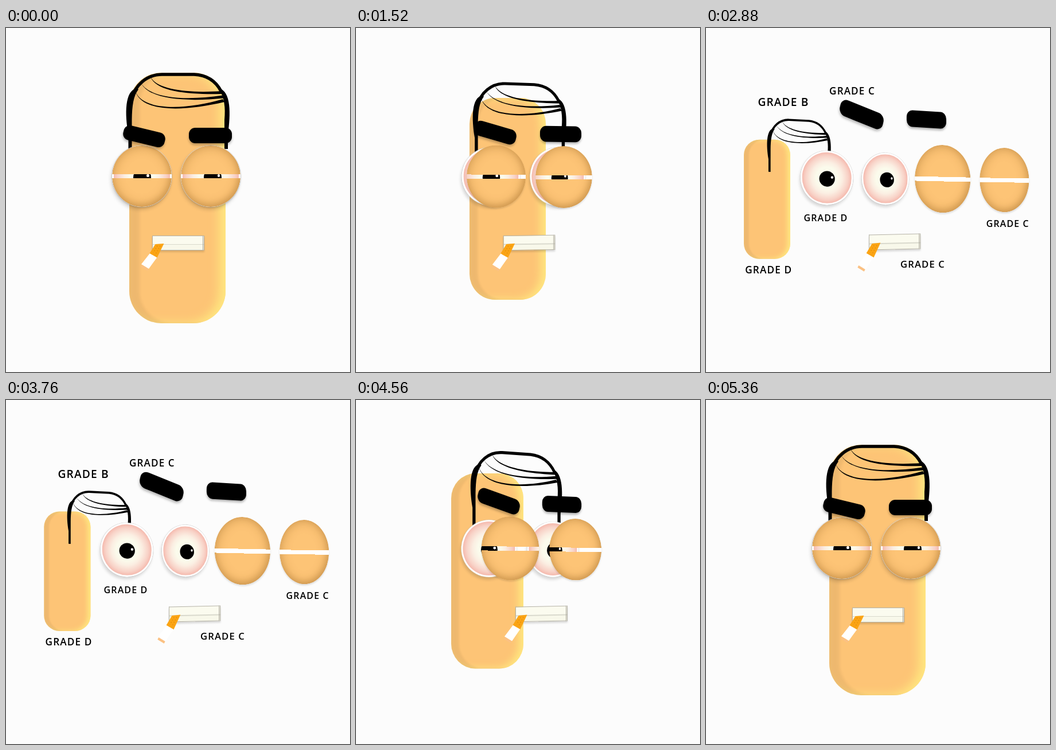
Animation, 600 px wide and 600 px high, one loop 5440 ms. Source, as an HTML page:

```html
<!DOCTYPE html>
<html lang="en">
<head>
<meta charset="utf-8">
<title>Exploding face</title>
<style>
html, body { margin: 0; width: 100%; height: 100%; overflow: hidden; background: #fcfcfc; }
#stage { position: absolute; left: 0; top: 0; width: 600px; height: 600px; overflow: hidden; }
.part { position: absolute; left: 0; top: 0; width: 600px; height: 600px; }
.part > * { position: absolute; box-sizing: border-box; }
svg { left: 0; top: 0; width: 600px; height: 600px; overflow: visible; }

.head {
  left: 215px; top: 78px; width: 168px; height: 437px; border-radius: 56px;
  background: #fdc476;
  box-shadow: inset 18px 0 5px rgba(0,0,0,.06), inset -11px 0 18px rgba(255,240,130,.8);
}
.brow { background: #000; border-radius: 11px; box-shadow: 0 3px 4px rgba(0,0,0,.28); }
.browL { left: 204px; top: 176px; width: 74px; height: 26px; transform: rotate(13.5deg); }
.browR { left: 319px; top: 174px; width: 75px; height: 27px; }

.eye, .shade { width: 104px; height: 107px; top: 205px; border-radius: 50%; }
.left { left: 185px; }
.right { left: 304.5px; }
.eye {
  border: 3px solid #fff;
  background: radial-gradient(closest-side, #fbfbec 42%, #fbeee2 62%, #f8d2c7 86%, #f5b9ad);
  box-shadow: 0 0 1px .5px #c4c4c4, -2px 5px 6px rgba(0,0,0,.15);
}
.eye i, .eye b { position: absolute; border-radius: 50%; }
.eye i { left: 33.5px; top: 37px; width: 31px; height: 31px; background: #000; }
.eye b { left: 23.5px; top: 10px; width: 4.5px; height: 4.5px; background: #fff; }
.right.eye i { left: 37.5px; }
.slot { top: 255px; height: 7.5px; width: 104px; background: #fff; }
.shade { box-shadow: 0 2px 3px rgba(0,0,0,.12); }
.lid {
  height: 100%; border-radius: 50%; background: #fdc476;
  box-shadow: inset 0 0 20px rgba(130,80,20,.42), inset -3px -4px 10px rgba(130,80,20,.16);
  -webkit-mask: linear-gradient(#000 47%, transparent 47% 53.6%, #000 53.6%);
  mask: linear-gradient(#000 47%, transparent 47% 53.6%, #000 53.6%);
}
.mouth {
  left: 255px; top: 362px; width: 91px; height: 26px;
  background: linear-gradient(#fbfbef 58%, #d9d9cd 58% 63%, #f8f8ea 63%);
  border: 1px solid #b4b1a4; border-right: 3px double #aaa79c;
  box-shadow: 0 3px 3px rgba(0,0,0,.13);
}
.label {
  width: 140px; line-height: 24px; text-align: center; white-space: nowrap; color: #000;
  font-family: "Open Sans", sans-serif; font-weight: 600; letter-spacing: 1.1px; opacity: 0;
}
</style>
</head>
<body>
<div id="stage">
  <div class="part" data-part="head"><div class="head"></div></div>

  <div class="part" data-part="hair">
    <svg viewBox="0 0 600 600">
      <path d="M219 125C224 100 246 81 272 81H328C350 82 366 93 375 110" fill="none" stroke="#000" stroke-width="5.5"/>
      <path d="M228 105C207 109 207 150 213.5 186V219H219.5V160C220 135 222 119 231 107Z"/>
      <path d="M371 105C393 110 392 150 387 186V211H381V160C383 138 381 122 371 105Z"/>
      <path d="M252 85C263 108 318 114 376 110L379 115C318 116.500 261 111 252 85Z"/>
      <path d="M236 97C254 124 318 126.500 377 117.500L380 122.500C318 128.500 252 126 236 97Z"/>
      <path d="M226 111C240 146 316 142.500 378 124L381 129C316 144.500 238 149 226 111Z"/>
    </svg>
  </div>

  <div class="part" data-part="lidL"><div class="slot left"></div></div>
  <div class="part" data-part="lidR"><div class="slot right"></div></div>
  <div class="part" data-part="eyeL"><div class="eye left"><i><b></b></i></div></div>
  <div class="part" data-part="eyeR"><div class="eye right"><i><b></b></i></div></div>
  <div class="part" data-part="lidL"><div class="shade left"><div class="lid"></div></div></div>
  <div class="part" data-part="lidR"><div class="shade right"><div class="lid"></div></div></div>
  <div class="part" data-part="lidNote"></div>
  <div class="part" data-part="browL"><div class="brow browL"></div></div>
  <div class="part" data-part="browR"><div class="brow browR"></div></div>

  <div class="part" data-part="mouth">
    <div class="mouth"></div>
    <svg viewBox="0 0 600 600">
      <path d="M251 393L263.500 400L249 420L236 412Z" fill="#fff"/>
      <path d="M237 413L248.500 420L246.500 423.500L235 416.500Z" fill="#fbc183"/>
      <path d="M260.500 377L275.500 376L263.500 400.500L250.500 393Z" fill="#fba414"/>
      <path d="M264 380L257 392M269 380L260 396" fill="none" stroke="#e38d08" stroke-width="1.500" stroke-dasharray="1.500 3"/>
    </svg>
  </div>
</div>

<script>
const LOOP = 5440, STEP = 80;

// Poses are [centre x, centre y, scale x, scale y, skew in degrees].
// near: openness reached late in the opening and early in the closing.
// label: [text, centre x, centre y, size] in the open layout.
const parts = {
  head: {
    rest: [299, 296.5, 1, 1, 0], early: [264.5, 298, .792, .805, 0],
    late: [229, 298.3, .75, .779, 0], open: [106.5, 298.7, .482, .476, 0],
    near: [.979, .972], label: ["GRADE D", 108.9, 421.5, 17.2]
  },
  hair: {
    rest: [299.5, 148, 1, 1, 0], early: [285, 159.5, .905, .92, 2],
    late: [279.3, 157, .885, .95, 4], open: [162, 206, .617, .67, 3],
    near: [.953, .925], label: ["GRADE B", 134.3, 128.6, 19.2]
  },
  eyeL: {
    rest: [237, 258.5, 1, 1, 0], early: [235.5, 258.7, .98, .95, 0],
    late: [232, 259, .93, .93, 0], open: [210.7, 261.3, .88, .88, 1],
    near: [.95, .93], label: ["GRADE D", 208, 331, 16]
  },
  eyeR: {
    rest: [356.5, 258.5, 1, 1, 0], early: [351.5, 259.3, .93, .95, 0],
    late: [343, 260.5, .86, .9, 0], open: [312.5, 263, .79, .845, 1],
    near: [.95, .93]
  },
  lidL: {
    rest: [237, 258.5, 1, 1, 0], early: [244.5, 259, .99, 1.02, .3],
    late: [269, 258.9, .97, 1.04, .6], open: [412.7, 263.2, .935, 1.105, 1.2],
    near: [.916, .904]
  },
  lidR: {
    rest: [356.5, 258.5, 1, 1, 0], early: [362, 260, .95, 1.01, .3],
    late: [382.2, 260.8, .875, 1.005, .6], open: [520, 265.2, .83, 1.05, .8],
    near: [.912, .904]
  },
  lidNote: {
    rest: [421, 339, 1, 1, 0], early: [425, 339, 1, 1, 0],
    late: [440, 339, 1, 1, 0], open: [525.8, 340.5, 1, 1, 0],
    near: [.93, .93], label: ["GRADE C", 525.8, 340.5, 16]
  },
  browL: {
    rest: [241, 189, 1, 1, 0], early: [243, 182.5, 1, 1.03, 2.5],
    late: [249, 176.5, 1, 1.07, 6], open: [271.5, 151, 1.04, 1.14, 8],
    near: [.93, .93], label: ["GRADE C", 254.9, 110.2, 17.1]
  },
  browR: {
    rest: [356.5, 187.5, 1, 1, 0], early: [357, 185, .96, 1.02, .8],
    late: [359, 182, .91, 1.04, 2.3], open: [384.5, 159.5, .92, 1.08, 3.5],
    near: [.93, .93]
  },
  mouth: {
    rest: [300.5, 375, 1, 1, 0], early: [302, 374.5, .995, 1.01, -.8],
    late: [323.5, 373, 1, 1.03, -1.2], open: [329.2, 373, .99, 1.04, -1.3],
    near: [.94, .98], label: ["GRADE C", 377, 411.7, 16.7]
  }
};

const mix = (a, b, p) => a.map((v, i) => v + (b[i] - v) * p);
const clamp = v => Math.min(1, Math.max(0, v));

const times = [880, 1360, 1520, 1920, 2000, 2480, 3600, 4080, 4240, 4560, 4640, 4720, 5360];

function knots({ rest, early, late, open, near: [n, m] }) {
  return [
    rest, mix(rest, early, .41), early,
    mix(rest, open, n - .03), mix(rest, open, n), open,
    open, mix(rest, open, .987), mix(rest, open, m),
    late, mix(rest, late, .45), mix(rest, late, .22), rest
  ];
}

// Monotone cubic through the knots: smooth, without overshoot.
function curve(ys) {
  const grade = i => (ys[i + 1] - ys[i]) / (times[i + 1] - times[i]);
  const slopes = ys.map((_, i) => {
    if (i === 0 || i === ys.length - 1) return 0;
    const a = grade(i - 1), b = grade(i);
    return a * b > 0 ? 2 * a * b / (a + b) : 0;
  });
  return t => {
    if (t <= times[0]) return ys[0];
    if (t >= times[times.length - 1]) return ys[ys.length - 1];
    const i = times.findIndex(x => x > t) - 1;
    const h = times[i + 1] - times[i], u = (t - times[i]) / h, v = 1 - u;
    return v * v * ((1 + 2 * u) * ys[i] + u * h * slopes[i])
         + u * u * ((1 + 2 * v) * ys[i + 1] - v * h * slopes[i + 1]);
  };
}

const labels = [];

// The label sits in its part, with the part's open pose undone.
function addLabel(el, { rest, open, label }) {
  const [text, x, y, size] = label;
  const [cx, cy] = rest, [ox, oy, sx, sy, k] = open;
  const div = document.createElement("div");
  div.className = "label";
  div.textContent = text;
  Object.assign(div.style, {
    left: x - 69.5 + "px", top: y - 12 + "px", fontSize: size + "px",
    transformOrigin: `${cx - x + 69.5}px ${cy - y + 12}px`,
    transform: `scale(${1 / sx}, ${1 / sy}) skewY(${-k}deg) translate(${cx - ox}px, ${cy - oy}px)`
  });
  el.append(div);
  labels.push(div);
}

const movers = [...document.querySelectorAll(".part")].map(el => {
  const part = parts[el.dataset.part], poses = knots(part);
  el.style.transformOrigin = `${part.rest[0]}px ${part.rest[1]}px`;
  if (part.label) addLabel(el, part);
  return { el, rest: part.rest, curves: part.rest.map((_, i) => curve(poses.map(p => p[i]))) };
});

function draw(now) {
  const t = Math.floor(now % LOOP / STEP) * STEP;
  for (const { el, rest, curves } of movers) {
    const [x, y, sx, sy, k] = curves.map(c => c(t));
    el.style.transform =
      `translate(${x - rest[0]}px, ${y - rest[1]}px) skewY(${k}deg) scale(${sx}, ${sy})`;
  }
  const shown = Math.min(clamp((t - 1920) / 170), clamp((4460 - t) / 300));
  for (const label of labels) label.style.opacity = shown;
  requestAnimationFrame(() => draw(performance.now()));
}
draw(performance.now());
</script>
</body>
</html>
```
